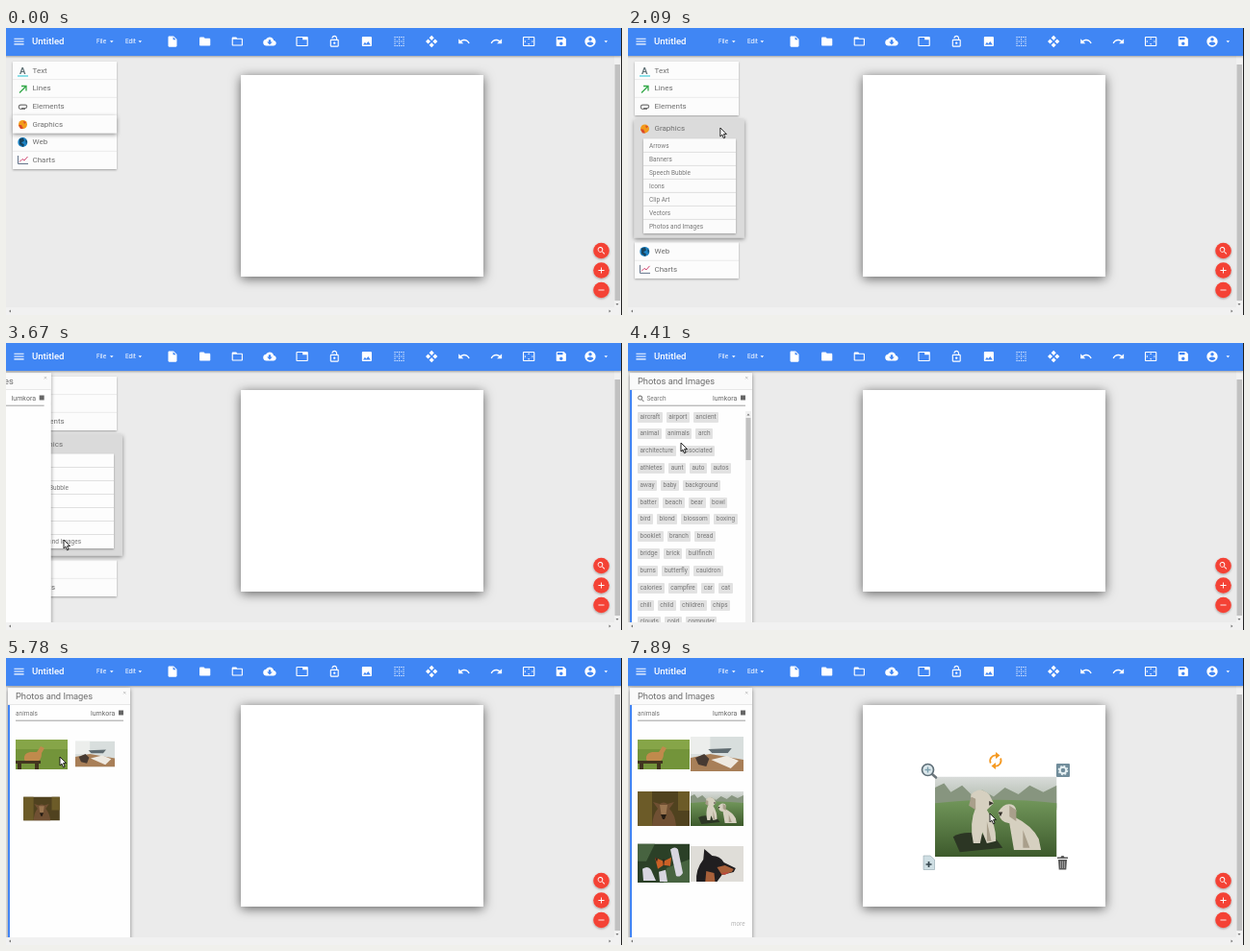
Animation of 640x299 px, one loop 8000 ms. Source, as an HTML page:

```html
<!DOCTYPE html>
<html lang="en">
<head>
<meta charset="utf-8">
<title>Design editor</title>
<style>
  html, body { margin: 0; width: 100%; height: 100%; overflow: hidden; background: #ebebeb; }
  svg { display: block; }
  #stage { width: 640px; height: 299px; font-family: Roboto, Arial, sans-serif; }
  .menu { font-size: 8px; fill: #707070; }
  .small { font-size: 6.5px; fill: #757575; }
  #tags { font: 6.5px/11px Roboto, Arial, sans-serif; color: #777; }
  #tags div { height: 17.83px; white-space: nowrap; }
  #tags span { display: inline-block; height: 11px; padding: 0 2.5px; margin-right: 4px; background: #e2e2e2; border-radius: 1px; }
</style>
</head>
<body>
<svg id="stage" viewBox="0 0 640 299">
  <defs>
    <filter id="deep" x="-20%" y="-20%" width="140%" height="140%">
      <feDropShadow dx="0" dy="2" stdDeviation="6" flood-color="#000" flood-opacity=".6"/>
    </filter>
    <filter id="soft" x="-20%" y="-20%" width="140%" height="150%">
      <feDropShadow dx="0" dy="1" stdDeviation="1" flood-color="#000" flood-opacity=".32"/>
    </filter>
    <filter id="lift" x="-20%" y="-20%" width="140%" height="150%">
      <feDropShadow dx="0" dy="1.5" stdDeviation="2" flood-color="#000" flood-opacity=".45"/>
    </filter>
    <linearGradient id="sky" x2="0" y2="1">
      <stop offset="0" stop-color="#d9dcda"/><stop offset="1" stop-color="#a9b4a4"/>
    </linearGradient>
    <linearGradient id="field" x2="0" y2="1">
      <stop offset="0" stop-color="#71965a"/><stop offset="1" stop-color="#3d5a2c"/>
    </linearGradient>
    <symbol id="deer" viewBox="0 0 54 31" preserveAspectRatio="none">
      <path fill="#73943a" d="M0 0h54v31H0z"/><path fill="#86a548" d="M0 0h54v10H0z"/>
      <path fill="#c08a4c" d="M9 21q-1-7 6-8l7 0 4-6 4 2-3 5q0 6-3 8H10z"/>
      <path fill="#42351f" d="M0 22h26v3H0zM2 25h4v6H2zM20 25h4v6h-4z"/>
    </symbol>
    <symbol id="desk" viewBox="0 0 54 36" preserveAspectRatio="none">
      <path fill="#d8dedd" d="M0 0h54v36H0z"/><path fill="#eceeec" d="M0 0h20v18H0z"/>
      <path fill="#a87f58" d="M0 22l20-4 34 6v12H0z"/><path fill="#5f6b70" d="M18 13l24-1-4 5H22z"/>
      <path fill="#473a32" d="M5 22l9-4 5 5-3 8-8-2z"/><path fill="#eee9e0" d="M21 24l16-4 12 5-8 8z"/>
    </symbol>
    <symbol id="stag" viewBox="0 0 54 36" preserveAspectRatio="none">
      <path fill="#50421f" d="M0 0h54v36H0z"/><path fill="#6c5b28" d="M0 0h15v36H0zM42 0h12v20H42z"/>
      <path fill="#705033" d="M15 36q1-13 6-18l-5-7 7 2q4-3 8 0l7-2-5 7q6 6 7 18z"/>
      <path fill="#9a7550" d="M23 14h8l-2 13h-4z"/><path fill="#261c13" d="M24 24h6l-2 5h-2z"/>
    </symbol>
    <symbol id="dogs" viewBox="0 0 54 36" preserveAspectRatio="none">
      <path fill="url(#sky)" d="M0 0h54v14H0z"/>
      <path fill="#87957f" d="M0 11V5l4-2 3 4 5-3 4 4 5-2 5 3 5-4 6 3 5-4 6 3 6-3v11H0z"/>
      <path fill="url(#field)" d="M0 12q28-3 54 0v24H0z"/>
      <path fill="#2c3624" d="M8 27q7-4 19 1l3 4-19 2z"/>
      <path fill="#d6d0c0" d="M17 30q-2-9 1-16-3-3-2-6 4-4 8 0l2 4-3 3q4 6 4 14l-4 1-2-5-1 5z"/>
      <path fill="#d6d0c0" d="M28 16q3-5 7-3 2 2 0 5 8 4 11 10l1 5H35l-2-12q-4 0-5-5z"/>
      <path fill="#a99f8b" d="M16 9l2 1 0 5-3-2zM33 13l3 2 0 5-3-2zM23 20l2 9-2 0zM39 24l3 8h-3z"/>
      <path fill="#37332c" d="M24 11l2 1-2 1zM28 16l2 0-1 2z"/>
    </symbol>
    <symbol id="butterfly" viewBox="0 0 54 40" preserveAspectRatio="none">
      <path fill="#2b4027" d="M0 0h54v40H0z"/><path fill="#476340" d="M0 0h18l-9 18H0zM30 25l24-9v24H27z"/>
      <path fill="#d8d6e0" d="M34 6q5-4 8 0l5 24q-3 5-7 3zM5 26q6-4 9 1l5 11H6zM22 29l7-2 2 12h-8z"/>
      <path fill="#cc6126" d="M18 14l9 4 8-4-1 9-7-1-6 4z"/><path fill="#30231b" d="M26 16h2l-1 9zM18 14l3 1-1 4z"/>
    </symbol>
    <symbol id="hound" viewBox="0 0 54 37" preserveAspectRatio="none">
      <path fill="#dfddd8" d="M0 0h54v37H0z"/>
      <path fill="#201e20" d="M6 37q-1-13 7-23l1-11 8 7q8 0 12 7l12 6-2 4-12 3-5 7z"/>
      <path fill="#a8603a" d="M27 22l8-2 9 4-2 3-10 3zM16 26l8 2 1 9H15z"/>
      <path fill="#c0483c" d="M31 28l9-1-5 3z"/>
    </symbol>
  </defs>

  <path fill="#ebebeb" d="M0 0h640v299H0z"/>
  <rect x="244" y="49" width="252" height="210" fill="#fff" filter="url(#deep)"/>

  <g id="picked">
    <use href="#dogs" x="319" y="123.5" width="126.5" height="83.5"/>
    <g stroke="#5f6f78" fill="none">
      <path stroke="#6d777c" stroke-width="2.6" stroke-linecap="round" d="M316 121l4 3.5"/>
      <circle cx="311.5" cy="116.5" r="6" fill="#dce8ec" stroke-width="1.7"/>
      <path stroke="#7da0ae" stroke-width="1.4" d="M308.5 116.5h6M311.500 113.500v6"/>
    </g>
    <g fill="none" stroke="#f59a23" stroke-width="1.8">
      <path d="M376.800 109.500a5.600 5.600 0 0 1 5.700-8M387 104.500a5.600 5.600 0 0 1-5.700 8"/>
      <path fill="#f59a23" stroke="none" d="M382 98l4.500 3.500-4.500 3.500zM382 109l-4.500 3.500 4.500 3.500z"/>
    </g>
    <rect x="445" y="110" width="14" height="14" rx="1" fill="#718d9b"/>
    <circle cx="452" cy="117" r="3.300" fill="none" stroke="#e6f0f3" stroke-width="2"/>
    <circle cx="452" cy="117" r="4.600" fill="none" stroke="#e6f0f3" stroke-width="1.400" stroke-dasharray="1.800 1.810"/>
    <path fill="#cfdfe4" stroke="#91a5ad" stroke-width=".6" d="M307 206h7l4.500 4v10.500H307z"/>
    <path stroke="#37474f" stroke-width="1.700" d="M309.500 215h6M312.500 212v6"/>
    <path fill="#595959" d="M446 207.500h3.500l1-1.500h2l1 1.500h3.500v1.500h-11zM447 210h9l-.7 10.500h-7.600z"/>
    <path stroke="#bbb" stroke-width=".7" d="M449.500 211.500v7.500M451.500 211.500v7.500M453.500 211.500v7.500"/>
  </g>

  <g id="menu">
    <g filter="url(#soft)"><rect x="7" y="35" width="108" height="56" fill="#fcfcfc"/></g>
    <path stroke="#e6e6e6" stroke-width=".8" d="M7 53.600h108M7 72.300h108"/>
    <text x="14" y="47.500" font-size="9.500" font-weight="700" fill="#5d6f73">A</text>
    <path stroke="#4fcfdc" stroke-width="1.300" d="M12 50h11"/>
    <path fill="none" stroke="#35a94a" stroke-width="1.300" d="M14 67.500l6.500-6.500M16 60.500h5v5"/>
    <path fill="none" stroke="#777" stroke-width="1.100" d="M20 84.500h-4.500a2.200 2.200 0 0 1 0-4.400h4.500a1.600 1.600 0 0 1 0 3.400h-4"/>
    <g class="menu"><text x="27.500" y="47">Text</text><text x="27.500" y="65.300">Lines</text><text x="27.500" y="84.400">Elements</text></g>

    <g id="tail">
      <rect x="7" y="109.500" width="108" height="37.500" fill="#fcfcfc" filter="url(#soft)"/>
      <path stroke="#e6e6e6" stroke-width=".8" d="M7 128.300h108"/>
      <circle cx="17.300" cy="119" r="5" fill="#1d84c6"/>
      <path fill="#17445f" d="M14 115.500l4-1 1 3-3 2 3 2-1 2.500-4-3zM20 116l2 2-1 3z"/>
      <path fill="none" stroke="#64748b" d="M12.500 133v8.500H23"/>
      <path fill="none" stroke="#d0436f" d="M14 139.500l3-3 2 1.500 3.500-4"/>
      <g class="menu"><text x="27.500" y="121">Web</text><text x="27.500" y="140.200">Charts</text></g>
    </g>

    <g id="fold">
      <g filter="url(#lift)"><rect id="foldBox" y="91"/></g>
      <circle cx="17.500" cy="100.500" r="4.500" fill="#f39b1b"/>
      <path fill="#d9482b" d="M13 101l3 0 2 4-3 0zM18 97l3 1-2 2z"/>
      <text class="menu" x="27.500" y="103">Graphics</text>
      <g id="subs"></g>
    </g>
  </g>

  <g id="side">
    <rect x="2" y="31" width="127" height="266" fill="#fefefe" filter="url(#lift)"/>
    <path fill="#fafafa" d="M2 31h127v17.500H2z"/><path stroke="#e2e2e2" stroke-width=".8" d="M2 48.500h127"/>
    <path fill="#4285f4" d="M2 49h2v248H2z"/>
    <text x="10" y="43" font-size="9.300" fill="#6a6a6a">Photos and Images</text>
    <path stroke="#aaa" stroke-width=".6" d="M122 35l2.500 2.500M124.500 35l-2.500 2.500"/>
    <path stroke="#8a8a8a" stroke-width=".8" d="M10 65.200h112"/>
    <g id="hint"><g id="lens"></g><text class="small" x="19.500" y="60.300">Search</text></g>
    <text id="query" class="small" x="10" y="60.300">animals</text>
    <text x="88" y="59.800" font-size="7" fill="#666">lumkora</text>
    <path fill="#666" d="M117 54.500h5v5h-5z"/>
    <g id="tagBox">
      <foreignObject x="10" y="71.500" width="112" height="224.500"><div id="tags"></div></foreignObject>
      <path fill="#f1f1f1" d="M122 71h6v225h-6z"/><path fill="#c1c1c1" d="M122.500 78h5v44h-5z"/>
      <path fill="#777" d="M123.500 75.500l1.500-2 1.500 2zM123.500 292l1.500 2 1.500-2z"/>
    </g>
    <g id="thumbs"></g>
    <text id="more" x="107" y="278.500" font-size="6.500" font-style="italic" fill="#b5b5b5">more</text>
  </g>

  <path fill="#f1f1f1" d="M0 291h632v8H0zM632 29h8v270h-8z"/>
  <path fill="#c1c1c1" d="M632.500 38h5.500v246h-5.500z"/>
  <path fill="#777" d="M5 293.500v3l-2-1.500zM626.500 293.500v3l2-1.500zM633.500 287h3l-1.500 2z"/>
  <path fill="#222" d="M639 0h1v299h-1z"/>
  <rect x="-5" y="-5" width="644" height="34" fill="#4086f4" filter="url(#soft)"/>
  <text x="27" y="17.300" font-size="9.600" font-weight="500" fill="#fff">Untitled</text>
  <g font-size="6.400" fill="#fff"><text x="94" y="16.300">File</text><text x="124" y="16.300">Edit</text>
    <path d="M108 13.200h3.600l-1.800 2zM137.500 13.200h3.600l-1.800 2zM621.500 13.200h3.600l-1.800 2z"/></g>
  <g id="bar" fill="#fff"></g>
  <g id="fabs"></g>
  <circle id="ring" fill="none" stroke="#e0526a" stroke-width=".9"/>
  <path id="cursor" fill="#fff" stroke="#111" stroke-width=".9" stroke-linejoin="round" d="M0 0v9l2-1.800 1.500 3.600 1.600-.7-1.500-3.500h2.900z"/>
</svg>
<script>
const LOOP = 8000;
const $ = id => document.getElementById(id);

const icons = {
  menu: 'M3 18h18v-2H3v2zm0-5h18v-2H3v2zm0-7v2h18V6H3z',
  file: 'M6 2c-1.100 0-2 .9-2 2v16c0 1.100.9 2 2 2h12c1.100 0 2-.9 2-2V8l-6-6H6zm7 7V3.500L18.500 9H13z',
  folder: 'M10 4H4c-1.100 0-2 .9-2 2v12c0 1.100.9 2 2 2h16c1.100 0 2-.9 2-2V8c0-1.100-.9-2-2-2h-8l-2-2z',
  open: 'M20 6h-8l-2-2H4c-1.100 0-2 .9-2 2v12c0 1.100.9 2 2 2h16c1.100 0 2-.9 2-2V8c0-1.100-.9-2-2-2zm0 12H4V8h16v10z',
  cloud: 'M19.350 10.040C18.670 6.590 15.640 4 12 4 9.110 4 6.600 5.640 5.350 8.040 2.340 8.360 0 10.910 0 14c0 3.310 2.690 6 6 6h13c2.760 0 5-2.240 5-5 0-2.640-2.050-4.780-4.650-4.960zM17 13l-5 5-5-5h3V9h4v4h3z',
  tab: 'M21 3H3c-1.100 0-2 .9-2 2v14c0 1.100.9 2 2 2h18c1.100 0 2-.9 2-2V5c0-1.100-.9-2-2-2zm0 16H3V5h10v4h8v10z',
  lock: 'M12 17c1.100 0 2-.9 2-2s-.9-2-2-2-2 .9-2 2 .9 2 2 2zm6-9h-1V6c0-2.760-2.240-5-5-5S7 3.240 7 6h1.900c0-1.710 1.390-3.100 3.100-3.100s3.100 1.390 3.100 3.100v2H6c-1.100 0-2 .9-2 2v10c0 1.100.9 2 2 2h12c1.100 0 2-.9 2-2V10c0-1.100-.9-2-2-2zm0 12H6V10h12v10z',
  image: 'M21 19V5c0-1.100-.9-2-2-2H5c-1.100 0-2 .9-2 2v14c0 1.100.9 2 2 2h14c1.100 0 2-.9 2-2zM8.500 13.500l2.500 3L14.500 12l4.500 6H5l3.500-4.500z',
  grid: [3, 7, 11, 15, 19].map(a => [3, 11, 19].map(b => `M${a} ${b}h2v2h-2z` + (a % 8 == 3 ? '' : `M${b} ${a}h2v2h-2z`)).join('')).join(''),
  move: 'M12 1l4.500 4.500L12 10 7.500 5.500zM12 14l4.500 4.500L12 23l-4.500-4.500zM5.500 7.500L10 12l-4.500 4.500L1 12zM18.500 7.500L23 12l-4.500 4.500L14 12z',
  undo: 'M12.500 8c-2.650 0-5.050 1-6.900 2.600L2 7v9h9l-3.620-3.620c1.390-1.160 3.160-1.880 5.120-1.880 3.540 0 6.550 2.310 7.600 5.500l2.370-.78C21.080 11.030 17.150 8 12.500 8z',
  redo: 'M11.500 8c2.650 0 5.050 1 6.900 2.600L22 7v9h-9l3.620-3.620c-1.390-1.160-3.160-1.880-5.120-1.880-3.540 0-6.550 2.310-7.600 5.500l-2.370-.78C2.920 11.030 6.850 8 11.500 8z',
  fit: 'M12 5.500L10 8h4zM18 10v4l2.500-2zM6 10l-2.500 2L6 14zM14 16h-4l2 2.500zM21 3H3c-1.100 0-2 .9-2 2v14c0 1.100.9 2 2 2h18c1.100 0 2-.9 2-2V5c0-1.100-.9-2-2-2zm0 16H3V5h18v14z',
  save: 'M17 3H5c-1.110 0-2 .9-2 2v14c0 1.100.89 2 2 2h14c1.100 0 2-.9 2-2V7l-4-4zm-5 16c-1.660 0-3-1.340-3-3s1.340-3 3-3 3 1.340 3 3-1.340 3-3 3zm3-10H5V5h10v4z',
  user: 'M12 2C6.480 2 2 6.480 2 12s4.480 10 10 10 10-4.480 10-10S17.520 2 12 2zm0 3c1.660 0 3 1.340 3 3s-1.340 3-3 3-3-1.340-3-3 1.340-3 3-3zm0 14.200c-2.500 0-4.710-1.280-6-3.220 0-2 4-3.080 6-3.080s6 1.090 6 3.080c-1.290 1.940-3.500 3.220-6 3.220z',
};
const search = 'M15.500 14h-.79l-.28-.27A6.500 6.500 0 1 0 13.700 14.400l.3.300v.8l5 5 1.500-1.500-5-5zm-6 0a4.500 4.500 0 1 1 0-9 4.500 4.500 0 0 1 0 9z';

const icon = (d, x, y, size, fill) =>
  `<path fill-rule="evenodd" d="${d}" transform="translate(${x - size / 2} ${y - size / 2}) scale(${size / 24})"${fill ? ` fill="${fill}"` : ''}/>`;

$('bar').innerHTML = Object.entries(icons).map(([name, d], i) => {
  const x = name == 'menu' ? 13.5 : name == 'user' ? 607 : 173 + (i - 1) * 33.65;
  return icon(d, x, 14, 13.5);
}).join('');

$('fabs').innerHTML = [search, 'M19 13h-6v6h-2v-6H5v-2h6V5h2v6h6v2z', 'M19 13H5v-2h14v2z'].map((d, i) => {
  const y = 232 + 20.5 * i;
  return `<circle cx="618.500" cy="${y}" r="8.300" fill="#f44336" filter="url(#soft)"/>` + icon(d, 618.5, y, 10.5, '#fff');
}).join('');

$('lens').innerHTML = icon(search, 13.5, 58, 9, '#666');

$('subs').innerHTML = '<rect x="16" y="111" width="96" height="98.500" fill="#fdfdfd" filter="url(#soft)"/>' +
  ['Arrows', 'Banners', 'Speech Bubble', 'Icons', 'Clip Art', 'Vectors', 'Photos and Images'].map((s, i) =>
    `<text class="small" x="22" y="${120.3 + 14 * i}">${s}</text>` +
    (i ? `<path stroke="#ddd" stroke-width=".9" d="M16 ${111 + 14 * i}h96"/>` : '')).join('');

$('tags').innerHTML = `aircraft airport ancient
animal animals arch
architecture associated
athletes aunt auto autos
away baby background
batter beach bear bowl
bird blond blossom boxing
booklet branch bread
bridge brick bullfinch
burns butterfly cauldron
calories campfire car cat
chill child children chips
clouds cold computer`.split('\n')
  .map(row => '<div>' + row.split(' ').map(w => `<span>${w}</span>`).join('') + '</div>').join('');

// id, box, start and end of the zoom
const photos = [
  ['deer', 10, 85, 54, 31, 5360, 5760], ['desk', 65, 82, 55, 36, 5480, 5880],
  ['stag', 10, 139, 54, 36, 5500, 5900], ['dogs', 65, 139, 55, 36, 5780, 6080],
  ['butterfly', 10, 193.5, 54, 40.5, 5850, 6150], ['hound', 65, 196, 55, 37, 5900, 6220],
];
$('thumbs').innerHTML = photos.map(([id, x, y, w, h]) =>
  `<use href="#${id}" x="${x}" y="${y}" width="${w}" height="${h}"/>`).join('');
const thumbs = [...$('thumbs').children];

const ticks = [
  [480, 1340, 7], [1660, 1820, 2], [1950, 2680, 6], [2840, 3830, 8], [3970, 4710, 6],
  [5000, 5120, 2], [5440, 5780, 3], [5940, 6360, 4], [6500, 7480, 8], [7610, 7890, 3],
].flatMap(([a, b, n]) => Array.from({ length: n }, (_, i) => Math.floor((a + (b - a) * i / (n - 1)) / 10) * 10));

const path = [
  [480, 164, 6], [1340, 98, 96], [1950, 98, 96], [2680, 76, 179], [2840, 76, 179],
  [3120, 60, 205], [3900, 60, 205], [4410, 55, 104], [4710, 56, 103], [5780, 56, 103],
  [6360, 59, 133], [6790, 94, 157], [7060, 94, 157], [7480, 237, 161], [7890, 376, 162],
];
const unfold = [[1660, 0], [1820, .09], [1950, .6], [2100, 1]];
const clicks = [[1660, 1950], [3260, 3540], [4700, 5120], [6780, 7050]];

const clamp = v => Math.max(0, Math.min(1, v));
const part = (t, a, b) => clamp((t - a) / (b - a));
const ease = k => k * k * (3 - 2 * k);

function at(t, keys, curve = k => k) {
  const i = keys.findIndex(k => k[0] > t);
  if (i < 0) return keys[keys.length - 1].slice(1);
  if (!i) return keys[0].slice(1);
  const [p, q] = [keys[i - 1], keys[i]];
  const k = curve(part(t, p[0], q[0]));
  return p.slice(1).map((v, j) => v + (q[j + 1] - v) * k);
}

const set = (id, attrs) => { for (const a in attrs) $(id).setAttribute(a, attrs[a]); };
const show = (id, on) => { $(id).style.display = on ? '' : 'none'; };

function render(time) {
  const t = ticks.reduce((last, k) => k <= time ? k : last, 0);

  const [e] = at(t, unfold);
  const shade = Math.round(252 - 34 * e);
  set('foldBox', { x: 7 - .5 * e, width: 108 + 6.5 * e, height: 18.5 + 107.5 * e, fill: `rgb(${shade},${shade},${shade})` });
  set('fold', { transform: `translate(0 ${4.5 * e})` });
  set('tail', { transform: `translate(0 ${117 * e})` });
  set('subs', { opacity: clamp((e - .2) / .8) });
  show('menu', t < 3820);

  show('side', t >= 3400);
  set('side', { transform: `translate(${-132 * (1 - ease(part(t, 3340, 3820)))} 0)` });
  show('hint', t < 5000);
  show('query', t >= 5000);
  show('tagBox', t >= 3970 && t < 5120);
  photos.forEach(([, x, y, w, h, a, b], i) => {
    const k = part(t, a, b), cx = x + w / 2, cy = y + h / 2;
    thumbs[i].style.display = k ? '' : 'none';
    thumbs[i].setAttribute('transform', `translate(${cx} ${cy}) scale(${k || 1}) translate(${-cx} ${-cy})`);
  });
  show('more', t >= 6500);
  show('picked', t >= 7050);

  const [x, y] = at(t, path, ease);
  show('cursor', t >= 480);
  set('cursor', { transform: `translate(${x} ${y})` });
  const hit = clicks.find(([a, b]) => t >= a && t < b);
  show('ring', hit);
  if (hit) set('ring', { cx: x + 1, cy: y + 1.5, r: 3 + 3.2 * part(t, hit[0], hit[0] + 150) });
}

const start = performance.now();
function frame() {
  render((performance.now() - start) % LOOP);
  requestAnimationFrame(frame);
}
frame();
</script>
</body>
</html>
```
